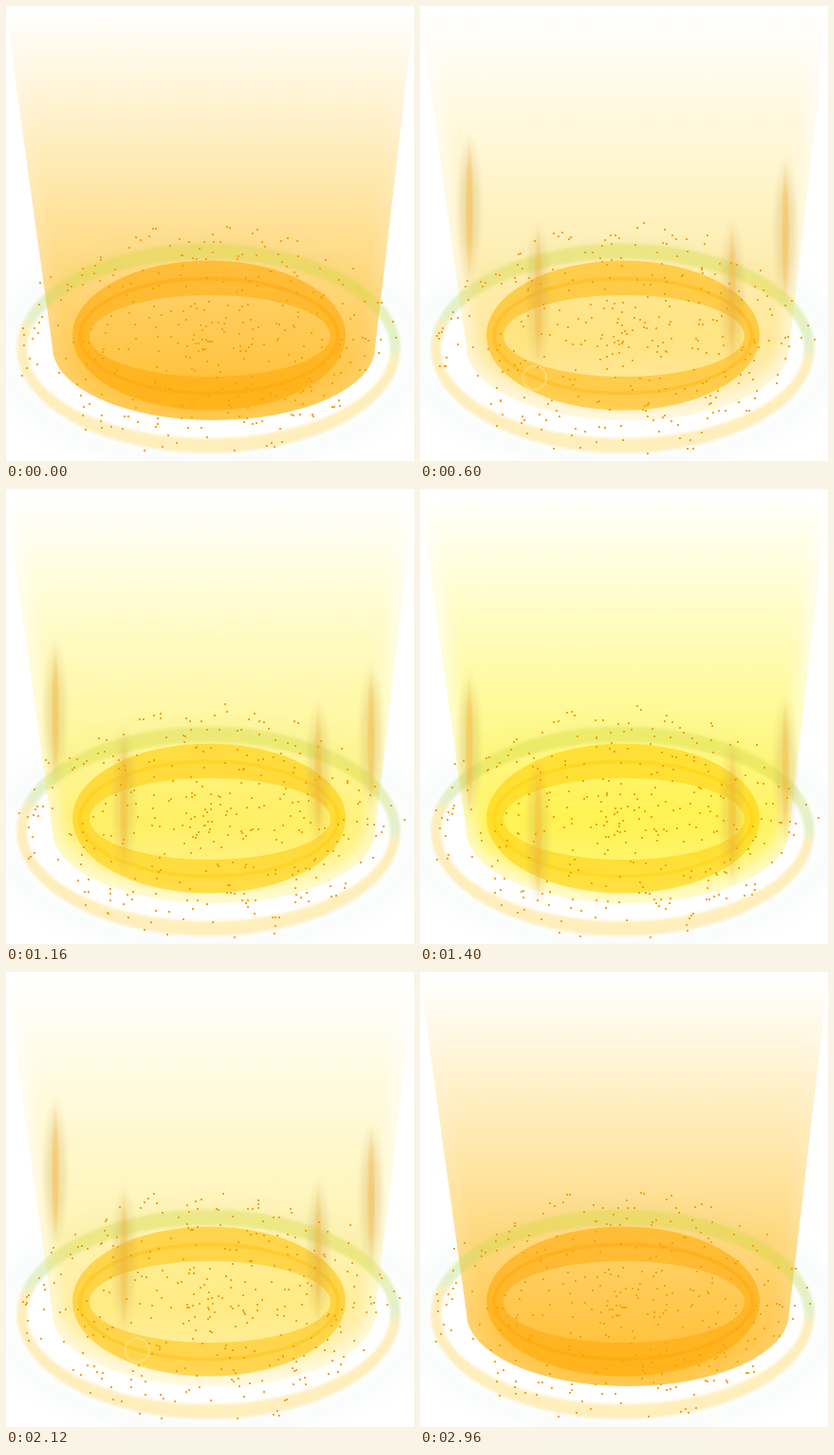
An HTML page with a canvas that plays this animation: 430 by 480 pixels, repeating every 3000 ms.

```html
<!DOCTYPE html>
<html lang="en">
<head>
<meta charset="utf-8">
<title>Light beam portal</title>
<style>
  html, body { margin: 0; width: 100%; height: 100%; overflow: hidden; background: #fff; }
  canvas { display: block; }
</style>
</head>
<body>
<canvas id="stage" width="430" height="480"></canvas>
<script>
const ctx = document.getElementById('stage').getContext('2d');
const TAU = Math.PI * 2;
const LOOP = 3000, STEP = 40, STEPS = LOOP / STEP;

// Seeded random numbers
let seed = 20231;
function rand() {
  seed = (seed + 0x6D2B79F5) | 0;
  let n = Math.imul(seed ^ (seed >>> 15), 1 | seed);
  n = (n + Math.imul(n ^ (n >>> 7), 61 | n)) ^ n;
  return ((n ^ (n >>> 14)) >>> 0) / 4294967296;
}

const rgba = (r, g, b, a) => `rgba(${r},${Math.round(g)},${b},${a})`;
const clamp = v => Math.max(0, Math.min(1, v));
const arch = p => Math.sin(Math.PI * p);

function oval(x, y, rx, ry, path = new Path2D()) {
  path.moveTo(x + rx, y);
  path.ellipse(x, y, rx, ry, 0, 0, TAU);
  return path;
}

// Ring between two ovals
const band = (outer, inner) => oval(...inner, oval(...outer));

const outerRing = band([213.5, 361, 202, 110.5], [213.5, 361.5, 191.5, 94.5]);
const mainRing = band([214, 347.5, 144, 79], [215, 348, 127, 43]);
const disc = oval(215, 348, 127, 43);
const ringLine = oval(214, 348, 136, 60.5);

const beam = new Path2D();
beam.moveTo(-1, 0);
beam.lineTo(49, 360);
beam.ellipse(219, 360, 170, 77, 0, Math.PI, 0, true);
beam.lineTo(431, 0);
beam.closePath();

const pillars = [
  { x: 52, base: 210, rise: 72, late: 0, ease: 1 },
  { x: 124.5, base: 303, rise: 73, late: 0, ease: 1 },
  { x: 329, base: 288, rise: 85, late: .1, ease: 2 },
  { x: 385, base: 236, rise: 73, late: 0, ease: 1 }
];

const sparks = Array.from({ length: 320 }, () => {
  const a = rand() * TAU, d = rand() ** .62;
  return {
    x: 213 + Math.cos(a) * d * 203,
    y: 353 + Math.sin(a) * d * 122,
    r: 2 + rand() * 6,
    phase: rand() * TAU,
    turns: (rand() < .5 ? -1 : 1) * (rand() < .5 ? 1 : 2)
  };
});

// Soft oval spot, clear inside the hollow part
function spot(x, y, rx, ry, color, alpha, hollow = 0) {
  ctx.save();
  ctx.translate(x, y);
  ctx.scale(rx, ry);
  const g = ctx.createRadialGradient(0, 0, hollow, 0, 0, 1);
  g.addColorStop(0, rgba(...color, hollow ? 0 : alpha));
  g.addColorStop(.5, rgba(...color, alpha * .85));
  g.addColorStop(1, rgba(...color, 0));
  ctx.fillStyle = g;
  ctx.fillRect(-1, -1, 2, 2);
  ctx.restore();
}

// power: strength of the light; glow: short flare of the foot of the beam
function drawBeam(green, power, glow) {
  const g = ctx.createLinearGradient(0, 5, 0, 437);
  g.addColorStop(0, rgba(255, green + 14, 0, 0));
  g.addColorStop(.8, rgba(255, green, 0, .63 * power));
  g.addColorStop(1, rgba(255, green, 0, .38 * power + .42 * glow));
  ctx.fillStyle = g;
  ctx.fill(beam);
  ctx.save();
  ctx.clip(beam);
  ctx.filter = 'blur(8px)';
  ctx.strokeStyle = rgba(255, 255, 255, .2 + .5 * (1 - glow));
  ctx.lineWidth = 16;
  ctx.stroke(beam);
  ctx.restore();
}

// Green behind, pale gold in front
function drawOuterRing() {
  const g = ctx.createLinearGradient(232, 168, 215, 372);
  g.addColorStop(.6, 'rgba(208,216,60,.38)');
  g.addColorStop(.85, 'rgba(180,220,125,.38)');
  g.addColorStop(.93, 'rgba(254,214,90,.4)');
  ctx.save();
  ctx.filter = 'blur(1.5px)';
  ctx.fillStyle = g;
  ctx.fill(outerRing, 'evenodd');
  ctx.restore();
}

function drawMainRing(green, mix) {
  ctx.fillStyle = rgba(255, green, 0, .15);
  ctx.fill(disc);
  const ringGreen = 167 + 41 * mix;
  ctx.fillStyle = rgba(255, ringGreen, 0, .57);
  ctx.fill(mainRing, 'evenodd');
  ctx.strokeStyle = rgba(252, ringGreen - 6, 0, .35);
  ctx.lineWidth = 4;
  ctx.stroke(ringLine);
}

function drawPillars(p) {
  for (const { x, base, rise, late, ease } of pillars) {
    const fade = clamp(Math.min(p / (.15 + late), (1 - p) / .04));
    const y = base - rise * arch(p - late) ** ease + 72;
    spot(x, y, 15, 82, [195, 160, 75], .26 * fade);
    spot(x, y, 5, 74, [250, 175, 50], .42 * fade);
  }
}

// A bubble that circles the ring once per pulse
function drawBubble(p) {
  const fade = .15 + .85 * arch(p) ** 4;
  const a = (.778 - p) * TAU;
  ctx.beginPath();
  ctx.arc(214 + 134 * Math.cos(a), 347 + 63 * Math.sin(a), 12.5, 0, TAU);
  ctx.strokeStyle = rgba(255, 240, 195, .4 * fade);
  ctx.lineWidth = 2;
  ctx.stroke();
}

function drawSparks(q) {
  ctx.fillStyle = '#f9a30c';
  for (const s of sparks) {
    const a = s.phase + q * s.turns * TAU;
    const x = Math.round(s.x + s.r * Math.cos(a));
    const y = Math.round(s.y + s.r * Math.sin(a));
    ctx.fillRect(x - 1, y - 1, 2, 2);
  }
}

// q: place in the whole loop; the light pulses twice in it
function draw(q) {
  const p = (q * 2) % 1;
  const mix = (1 - Math.cos(q * TAU)) / 2;
  const wave = (1 + Math.cos(p * TAU)) / 2;
  const green = 176 + 60 * mix;
  ctx.fillStyle = '#fff';
  ctx.fillRect(0, 0, 430, 480);
  spot(214, 365, 255, 135, [225, 240, 232], .2, .72);
  drawBeam(green, .6 + .4 * wave, (1 - mix) * wave ** 2);
  drawOuterRing();
  drawMainRing(green, mix);
  drawPillars(p);
  drawBubble(p);
  drawSparks(q);
}

const start = performance.now();
function tick() {
  const t = (performance.now() - start) % LOOP;
  draw(Math.floor(t / STEP) / (STEPS - 1));
  requestAnimationFrame(tick);
}
tick();
</script>
</body>
</html>
```
